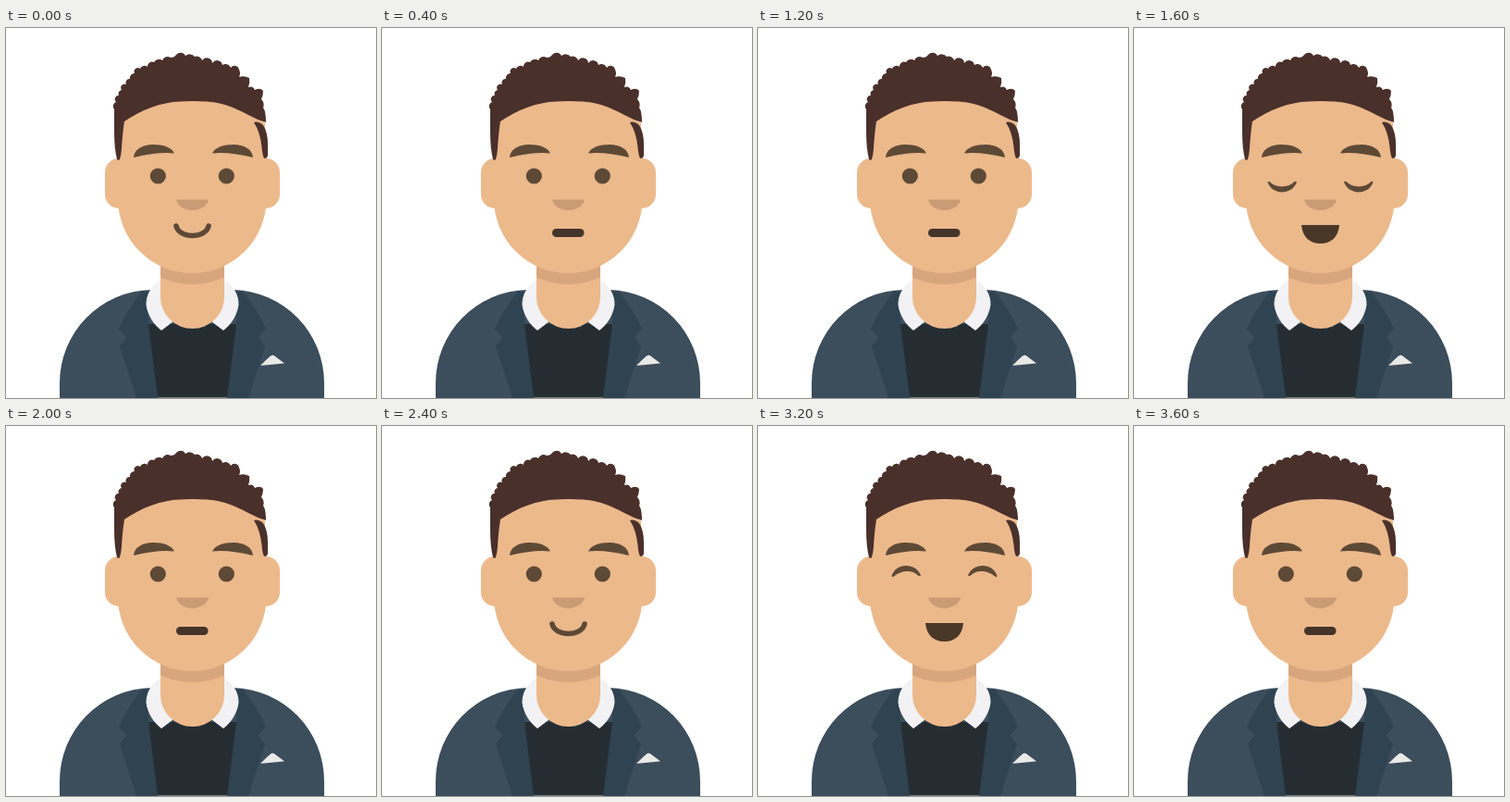
These frames come from a looping animation (400x400 px, 4000 ms). An HTML page:

```html
<!DOCTYPE html>
<html lang="en">
<head>
<meta charset="utf-8">
<title>Avatar expressions</title>
<style>
  html, body { margin: 0; width: 100%; height: 100%; overflow: hidden; background: #fff; }
  svg { display: block; width: 100vw; height: 100vh; }
  .skin { fill: #ecb98b; }
  .hair { fill: #4a302b; }
  .dark { fill: #5d4935; }
  .mouth { fill: #493828; }
  .lapel { fill: #2f4351; }
  .collar { fill: #f2f2f4; }
  .face { visibility: hidden; animation: 4s step-end infinite; }
  .smile { animation-name: smile; }
  .neutral { animation-name: neutral; }
  .happy { animation-name: happy; }
  .calm { animation-name: calm; }
  @keyframes smile {
    0%, 60% { visibility: visible; }
    10%, 70%, 100% { visibility: hidden; }
  }
  @keyframes neutral {
    0%, 20%, 40%, 60%, 80% { visibility: hidden; }
    10%, 30%, 50%, 70%, 90% { visibility: visible; }
  }
  @keyframes happy {
    0%, 30%, 90%, 100% { visibility: hidden; }
    20%, 80% { visibility: visible; }
  }
  @keyframes calm {
    0%, 50%, 100% { visibility: hidden; }
    40% { visibility: visible; }
  }
</style>
</head>
<body>
<svg viewBox="0 0 400 400">
  <defs>
    <path id="neck" d="M167 240H236V291A34.5 34 0 0 1 167 291Z"/>
    <clipPath id="neckClip"><use href="#neck"/></clipPath>
    <path id="lapel" d="M154 284L147 285Q132 303 122 325L130.500 334L123 344L141 400H164L154 320Z"/>
    <path id="collar" d="M168 272C157 278 151.500 288 151.500 299C153 311 160 321 168 327L178 319.500L190 310L180 280Z"/>
    <path id="brow" d="M138 140C138.500 131 148 126 159 126C170 126 179 129 182 135.500Q165 133.500 138 140Z"/>
    <g id="dots" class="dark"><circle cx="164.3" cy="160" r="8.6"/><circle cx="238.3" cy="160" r="8.6"/></g>
    <path id="arch" d="M144.500 162C149 148 170 147 176 161.500Q175 163 173 161.500C166 155 155 156 147 162.500Q145 164 144.500 162Z"/>
    <path id="lid" d="M144.500 166.500C149 181 171 181 176 166.500Q175 165 173 166.500C166 173 154 173 147 166.500Q145 165 144.500 166.500Z"/>
    <path id="open" class="mouth" d="M181 213H222C221 226 213 233 201.500 233S182 226 181 213Z"/>
  </defs>

  <!-- body -->
  <path fill="#3c4d5b" d="M58 400V384A101 101 0 0 1 157 283H246A101 101 0 0 1 344 384V400Z"/>
  <path fill="#252d33" d="M154 320H249Q248 350 239 400H164Q155 350 154 320Z"/>
  <use href="#lapel" class="lapel"/>
  <use href="#lapel" class="lapel" transform="matrix(-1 0 0 1 403 0)"/>
  <path fill="#74797c" d="M164 399H239V400H164Z"/>
  <path fill="#e9e9e6" d="M275 365L281 359L286 354.500Q288.500 353 291 355L301 362.500Z"/>

  <!-- neck and head -->
  <use href="#collar" class="collar"/>
  <use href="#collar" class="collar" transform="matrix(-1 0 0 1 403 0)"/>
  <use href="#neck" class="skin"/>
  <circle cx="201.500" cy="197" r="80" fill="#d8a67d" clip-path="url(#neckClip)"/>
  <rect class="skin" x="107" y="141" width="189" height="54" rx="15"/>
  <path class="skin" d="M121 185V105Q155 72 201 72Q250 72 280 103L281.500 185A80.250 80 0 0 1 121 185Z"/>

  <!-- hair: each arc is one curl -->
  <path class="hair" d="M120 142Q117 130 117 112V88A5 5 0 0 1 119 80A4 4 0 0 1 122 73A4 4 0 0 1 125 67A4 4 0 0 1 130 61A4 4 0 0 1 134 55A5 5 0 0 1 139 49A4 4 0 0 1 145 44A5 5 0 0 1 153 42A5 5 0 0 1 160 37A6 6 0 0 1 169 35A6 6 0 0 1 178 32Q182 32 184 29A6 6 0 0 1 194 30A7 7 0 0 1 204 31A6 6 0 0 1 212 35A6 6 0 0 1 223 38A6 6 0 0 1 234 40A6 6 0 0 1 243 43A5 5 0 0 1 252 45Q254 49 252 53Q257 51 263 54Q264 59 262 64Q267 62 269 67Q275 64 278 68Q278 73 276 77Q280 81 278 86Q281 90 281 102Q271 99 262 94C245 85 231 80 217 79.500Q200 78.500 188 79.500C168 80 145 89 128 101Q126 113 125 130Q124 142 122 143Z"/>
  <path class="hair" d="M268 102Q273 100 278 105Q283 113 283 125V137Q283 141 279.500 141Q277.500 140 276.500 129Q275 113 268 102Z"/>

  <!-- features -->
  <use href="#brow" class="dark"/>
  <use href="#brow" class="dark" transform="matrix(-1 0 0 1 405 0)"/>
  <path fill="#ca9c75" d="M184 185.500H219C217 193 210 197 201.500 197S186 193 184 185.500Z"/>

  <g class="face smile">
    <use href="#dots"/>
    <path d="M184 214C187 228 216 228 219 214" fill="none" stroke="#5d4935" stroke-width="5.600" stroke-linecap="round"/>
  </g>
  <g class="face neutral">
    <use href="#dots"/>
    <rect x="184" y="217" width="34.500" height="9" rx="4.500" fill="#44342a"/>
  </g>
  <g class="face happy">
    <use href="#arch" class="dark"/>
    <use href="#arch" class="dark" transform="matrix(-1 0 0 1 403 0)"/>
    <use href="#open"/>
  </g>
  <g class="face calm">
    <use href="#lid" class="dark"/>
    <use href="#lid" class="dark" transform="matrix(-1 0 0 1 403 0)"/>
    <use href="#open"/>
  </g>
</svg>
</body>
</html>
```
